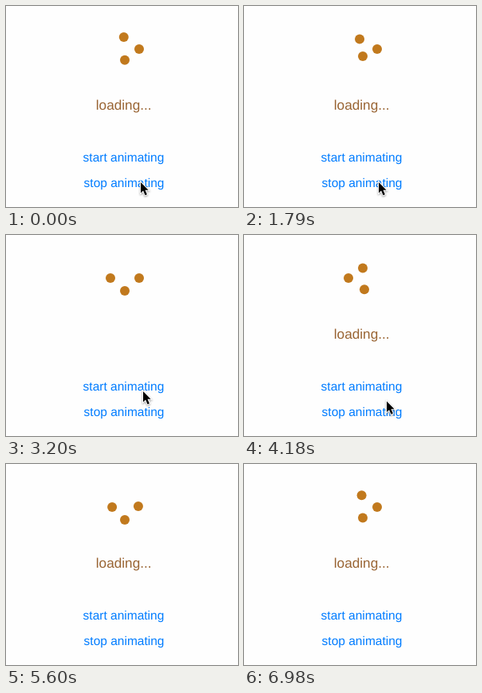
Recreate the animation shown at these times as an HTML page. Size 291 px wide and 252 px high, loop 7000 ms.

```html
<!DOCTYPE html>
<html lang="en">
<head>
<meta charset="utf-8">
<title>Loading dots</title>
<style>
  html, body { margin: 0; width: 100%; height: 100%; overflow: hidden; background: #fefefe; }
  svg { display: block; width: 291px; height: 252px; }
  text { font: 15.5px "Liberation Sans", Arial, sans-serif; fill: #007cff; text-rendering: geometricPrecision; }
  #label { font-size: 17.2px; fill: #996433; }
  circle { fill: #c1791d; }
</style>
</head>
<body>
<svg viewBox="0 0 291 252">
  <circle r="6"/><circle r="6"/><circle r="6"/>
  <text id="label" x="112.8" y="129.8">loading...</text>
  <text id="start" x="96.6" y="194.5">start animating</text>
  <text id="stop" x="97.6" y="226.5">stop animating</text>
  <path id="cursor" d="M0 0V13.4L3.1 10.6 5.5 16.2 7.9 15.2 5.5 9.7H9.6Z"
    stroke="#fff" stroke-width="2" paint-order="stroke" style="filter:drop-shadow(0 1px 1px #0006)"/>
</svg>
<script>
const LOOP = 7000, STEP = 464;
const STOP_AT = 2738, RETURN_TIME = 300, LABEL_AT = 3400, RESTART = 3824, FIRST_MOVE = 3890;
// Slots in clockwise order: top, right, bottom, left. One is always empty.
const SLOTS = [[149, 38], [167, 54], [149, 70], [131, 54]];
// Cursor keys: time, x, y
const CURSOR = [[0, 169, 221], [2890, 169, 221], [3190, 172, 196], [3890, 172, 196],
  [4180, 179, 208.5], [4550, 180, 220], [4650, 181, 221], [5050, 244, 256]];

const $ = id => document.getElementById(id);
const circles = document.querySelectorAll('circle');
const clamp = v => Math.min(1, Math.max(0, v));
const mix = (a, b, k) => a + (b - a) * k;

// cubic-bezier(.42, 0, .58, 1)
function ease(x) {
  let lo = 0, hi = 1;
  for (let i = 0; i < 20; i++) {
    const p = (lo + hi) / 2, q = 1 - p;
    if (1.26 * q * q * p + 1.74 * q * p * p + p ** 3 < x) lo = p; else hi = p;
  }
  return lo * lo * (3 - 2 * lo);
}

const firstRun = t => 2.815 + t / STEP;

// The empty slot travels from `gap` to the next one clockwise.
function placeDots(gap, k) {
  [[1, 2], [2, 0], [3, 3]].forEach(([from, to], i) => {
    const a = SLOTS[(gap + from) % 4], b = SLOTS[(gap + to) % 4];
    circles[i].setAttribute('cx', mix(a[0], b[0], k));
    circles[i].setAttribute('cy', mix(a[1], b[1], k));
  });
}

function drawDots(t) {
  if (t >= STOP_AT && t < FIRST_MOVE) {
    const reached = ease(firstRun(STOP_AT) % 1);
    placeDots(0, reached * (1 - ease(clamp((t - STOP_AT) / RETURN_TIME))));
  } else {
    const u = t < STOP_AT ? firstRun(t) : (t - RESTART) / STEP;
    placeDots(Math.floor(u) % 4, ease(u % 1));
  }
}

// Pressed button dims at once and fades back after release.
function drawButton(id, t, press, release) {
  const k = t < press ? 1 : ease(clamp((t - release) / 370));
  $(id).setAttribute('opacity', mix(0.2, 1, k));
}

function drawCursor(t) {
  const i = CURSOR.findIndex(key => key[0] > t);
  $('cursor').style.display = i < 0 ? 'none' : '';
  if (i < 0) return;
  const [t0, x0, y0] = CURSOR[i - 1], [t1, x1, y1] = CURSOR[i];
  const k = (t - t0) / (t1 - t0);
  $('cursor').setAttribute('transform', `translate(${mix(x0, x1, k)} ${mix(y0, y1, k)})`);
}

function draw(t) {
  drawDots(t);
  $('label').style.display = t >= STOP_AT && t < LABEL_AT ? 'none' : '';
  drawButton('stop', t, 2680, STOP_AT);
  drawButton('start', t, 3350, LABEL_AT);
  drawCursor(t);
}

const began = performance.now();
function tick() {
  draw((performance.now() - began) % LOOP);
  requestAnimationFrame(tick);
}
tick();
</script>
</body>
</html>
```
